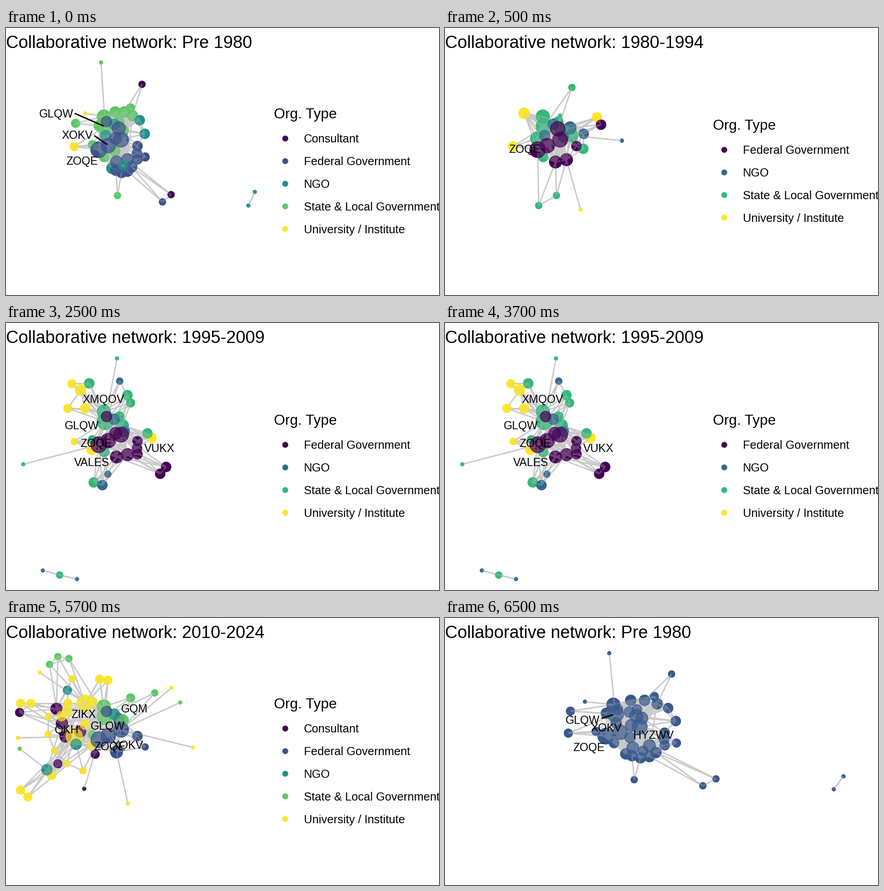
Animation of 952 by 588 pixels, one loop 8000 ms. Source, as a matplotlib script:

```python
from itertools import combinations
from math import cos, dist, log, radians, sin

import matplotlib.pyplot as plt
from matplotlib.animation import FuncAnimation
from matplotlib.collections import LineCollection
from matplotlib.patches import Circle
from numpy import linspace

W, H, DPI = 952, 588, 100
PT = 72 / DPI
EDGE, NODE_ALPHA = "#C9C9C9", 0.68
plt.rcParams["font.family"] = "Liberation Sans"

FIVE = {"C": "#440154", "F": "#3B528B", "N": "#21908C", "S": "#5DC863", "U": "#FDE725"}
FOUR = {"F": "#440154", "N": "#31688E", "S": "#35B779", "U": "#FDE725"}
MONO = dict.fromkeys("CFNSU", "#38598C")
NAMES = {"C": "Consultant", "F": "Federal Government", "N": "NGO",
         "S": "State & Local Government", "U": "University / Institute"}

# Long-lived organisations (x, y, ties); each period takes a run of them.
CORE = {
    "S": [(274, 176, 3), (190, 257, 3), (256, 226, 7), (215, 195, 9),
          (218, 217, 17), (249, 206, 4), (216, 284, 4)],
    "N": [(305, 233, 4), (219, 237, 5), (238, 212, 5), (260, 239, 5)],
    "F": [(248, 221, 9), (306, 284, 3), (241, 243, 7), (289, 289, 4),
          (288, 276, 4), (221, 206, 5), (289, 260, 4), (253, 246, 13),
          (225, 259, 12), (204, 268, 16), (243, 295, 7), (267, 290, 7)],
}
HUB_TIES, HUB_SPAN, HUB_REACH, PEER_SPAN = 5, 110, 200, 45


def radius(ties):
    return 4.5 + 5 * log(ties)


def arc(x, y, r, start, end, n):
    return [(x + r * cos(a), y + r * sin(a))
            for a in map(radians, linspace(start, end, n))]


class Network:
    """Places nodes; their links follow from position and number of ties."""

    def __init__(self):
        self.spots, self.ties, self.kinds = [], [], []

    def add(self, kind, ties, *spots):
        self.spots += spots
        self.ties += [ties] * len(spots)
        self.kinds += [kind] * len(spots)

    def add_core(self, **runs):
        for kind, (start, end) in runs.items():
            for x, y, ties in CORE[kind][start:end]:
                self.add(kind, ties, (x, y))

    def links(self):
        def gap(a, b):
            return dist(self.spots[a], self.spots[b])

        def is_peer(a):
            return 1 < self.ties[a] < HUB_TIES

        everyone = range(len(self.spots))
        hubs = [i for i in everyone if self.ties[i] >= HUB_TIES]
        found = {(a, b) for a, b in combinations(hubs, 2) if gap(a, b) < HUB_SPAN}
        found |= {(a, b) for a, b in combinations(filter(is_peer, everyone), 2)
                  if gap(a, b) < PEER_SPAN}
        # Smaller nodes are drawn to large, close hubs; remote ones to each other.
        for i in set(everyone) - set(hubs):
            isolated = min(gap(i, h) for h in hubs) > HUB_REACH
            pool = [j for j in (everyone if isolated else hubs) if j != i]
            pool.sort(key=lambda j: gap(i, j) / radius(self.ties[j]))
            found |= {(i, j) for j in pool[:self.ties[i]]}
        return sorted(found)


early = Network()
early.add("U", 1, (174, 188))
early.add("U", 3, (150, 261))
early.add("C", 2, (299, 124), (363, 367))
early.add("S", 1, (209, 76))
early.add("S", 2, (245, 369))
early.add("S", 3, (153, 210))
early.add("S", 5, (205, 215), (239, 271), *arc(250, 232, 48, -102, -54, 3))
early.add("N", 1, (533, 391), (547, 361))
early.add("N", 4, (294, 203))
early.add("N", 5, (233, 309))
early.add("F", 2, (344, 383))
early.add("F", 5, *arc(256, 295, 23, 28, 128, 4))
early.add_core(S=(0, 7), N=(0, 3), F=(0, 12))
early.add("N", 4, (258, 302))

eighties = Network()
eighties.add("U", 1, (298, 400))
eighties.add("U", 4, (150, 261), (334, 197))
eighties.add("U", 5, (174, 188))
eighties.add("S", 1, (253, 193))
eighties.add("S", 2, (279, 131), (245, 369), (206, 391))
eighties.add("S", 4, (304, 266))
eighties.add("S", 8, (202, 243), (278, 237))
eighties.add("N", 1, (389, 248))
eighties.add("N", 7, (275, 220))
eighties.add("F", 4, (343, 213))
eighties.add_core(S=(2, 7), N=(0, 4), F=(6, 12))
eighties.add("F", 12, (248, 222))

nineties = Network()
nineties.add("U", 2, (150, 261))
nineties.add("U", 3, (145, 134), (136, 188))
nineties.add("U", 4, (174, 188), (188, 279), (320, 253))
nineties.add("U", 5, (164, 148))
nineties.add("S", 1, (244, 78), (38, 311))
nineties.add("S", 2, (118, 555))
nineties.add("S", 4, (183, 133), (267, 159), (193, 351), (311, 243))
nineties.add("N", 1, (81, 545), (156, 564))
nineties.add("N", 2, (250, 128), (224, 333))
nineties.add("N", 4, (212, 357))
nineties.add("F", 4, (352, 317), (339, 332))
nineties.add_core(S=(0, 7), N=(2, 4), F=(2, 12))

recent = Network()
recent.add("C", 1, (172, 376))
recent.add("C", 3, (30, 208), (196, 300), (114, 321))
recent.add("C", 6, (111, 200), (123, 232), (131, 261), (163, 250))
recent.add("U", 1, (74, 120), (26, 264), (268, 409), (411, 285), (364, 154))
recent.add("U", 2, (145, 134), *arc(192, 238, 101, 192, 103, 5))
recent.add("U", 3, (206, 135), (224, 137), (32, 188), (55, 188), (136, 188),
           (191, 184), (32, 379), (48, 394))
recent.add("U", 4, (100, 345), (188, 279), (134, 205), (122, 216), (174, 235))
recent.add("U", 18, (174, 188), (150, 261))
recent.add("S", 1, (383, 186), (30, 288))
recent.add("S", 2, (327, 165), *arc(122, 112, 28, 201, 306, 3))
recent.add("N", 3, (135, 159))
recent.add("N", 5, (154, 278), (90, 334))
recent.add("F", 2, (306, 284))
recent.add("F", 5, (248, 222))
recent.add_core(S=(0, 5), N=(2, 3), F=(5, 11))


def widen(x, y):
    return 360.3 + 1.524 * (x - 208.5), 77.7 + 0.9505 * (y - 76)


def keep(x, y):
    return x, y


# network, placement, palette, legend shown, period, labels, leader lines
SCENES = [
    (early, keep, FIVE, True, "Pre 1980",
     {"GLQW": (110, 188), "XOKV": (157, 235), "ZOQE": (167, 292)},
     [[(151, 188), (215, 216)], [(194, 237), (223, 257)]]),
    (eighties, keep, FOUR, True, "1980-1994", {"ZOQE": (175, 266)}, []),
    (nineties, keep, FOUR, True, "1995-2009",
     {"XMQOV": (214, 167), "GLQW": (166, 225), "ZOQE": (198, 264),
      "VUKX": (337, 275), "VALES": (189, 306)}, []),
    (recent, keep, FIVE, True, "2010-2024",
     {"ZIKX": (171, 211), "GQM": (282, 199), "GLQW": (223, 237),
      "QKH": (134, 245), "ZOQE": (228, 282), "XOKV": (268, 279)}, []),
    (early, widen, MONO, False, "Pre 1980",
     {"GLQW": (302, 224), "XOKV": (355, 241), "ZOQE": (316, 284),
      "HYZWV": (458, 257)}, [[(344, 221), (370, 213)]]),
]
STARTS = [0, 1, 5, 9, 13]
FRAMES, INTERVAL = 16, 500

fig = plt.figure(figsize=(W / DPI, H / DPI), dpi=DPI, facecolor="white")
ax = fig.add_axes([0, 0, 1, 1])
ax.set(xlim=(0, W), ylim=(H, 0))
ax.axis("off")


def text(x, y, s, size, ha="left"):
    return ax.text(x, y, s, fontsize=size * PT, ha=ha, va="baseline", zorder=5)


def lines(segments, color, width, zorder):
    return ax.add_collection(LineCollection(
        segments, colors=color, linewidths=width * PT, zorder=zorder))


def dot(spot, r, color, alpha=1, zorder=1):
    # Stroke and fill overlap, so translucent dots get a darker rim.
    return ax.add_patch(Circle(spot, r - 1, facecolor=color, edgecolor=color,
                               linewidth=2 * PT, alpha=alpha, zorder=zorder))


def legend(palette):
    top = 343 - 24.9 * (len(palette) - 1)
    parts = [text(589, top - 44.5, "Org. Type", 31.67)]
    for i, (kind, color) in enumerate(palette.items()):
        y = top + 49.8 * i
        parts += [dot((614, y), 6.5, color), text(655, y + 9, NAMES[kind], 25.33)]
    return parts


def build(net, place, palette, has_legend, period, labels, leaders):
    spots = [place(*spot) for spot in net.spots]
    parts = [text(0, 44, f"Collaborative network: {period}", 38)]
    for alpha, zorder in ((1, 1), (NODE_ALPHA, 3)):
        parts += [dot(spot, radius(ties), palette[kind], alpha, zorder)
                  for spot, ties, kind in zip(spots, net.ties, net.kinds)]
    parts.append(lines([(spots[a], spots[b]) for a, b in net.links()], EDGE, 3, 2))
    parts.append(lines(leaders, "black", 3, 4))
    parts += [text(x, y + 9, s, 24.6, "center") for s, (x, y) in labels.items()]
    return parts + (legend(palette) if has_legend else [])


scenes = [build(*scene) for scene in SCENES]


def update(frame):
    current = sum(frame >= start for start in STARTS) - 1
    for i, parts in enumerate(scenes):
        for part in parts:
            part.set_visible(i == current)
    return []


anim = FuncAnimation(fig, update, frames=FRAMES, interval=INTERVAL,
                     repeat=True, repeat_delay=0, blit=False)
plt.show()
```
